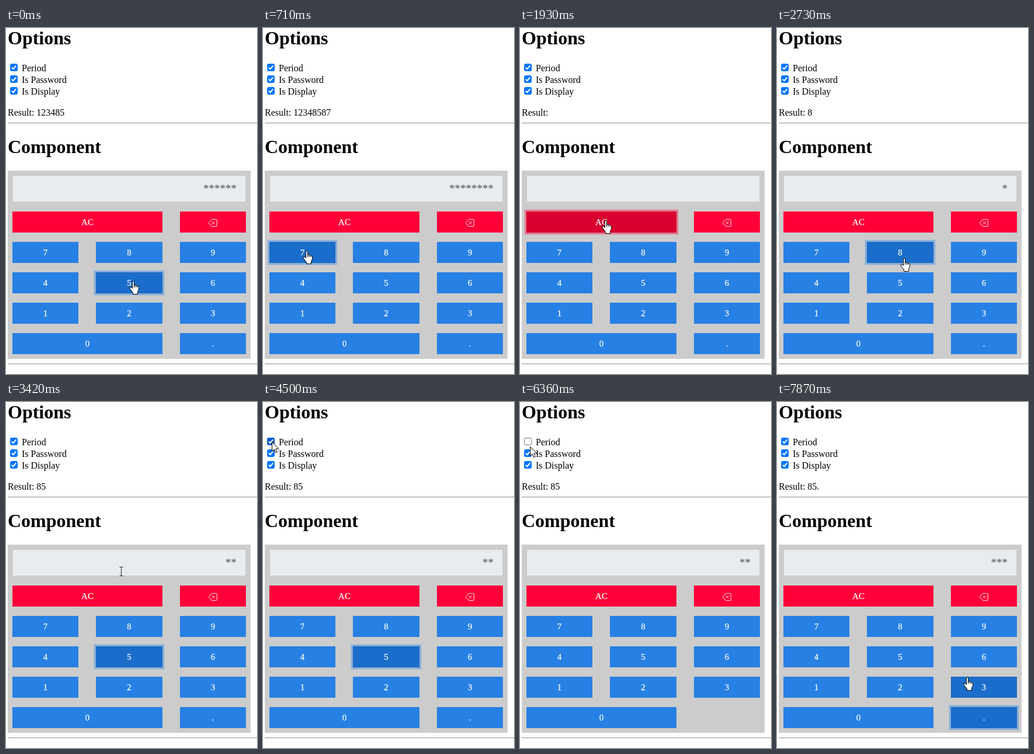
An HTML page for the animation above (7.99 s loop, 430 by 592 pixels).

```html
<!DOCTYPE html>
<html lang="en">
<head>
<meta charset="utf-8">
<title>Keypad</title>
<style>
html, body { margin: 0; width: 100%; height: 100%; overflow: hidden; background: #fff; }
svg { display: block; width: 430px; height: 592px; font: 16px "Liberation Serif", "Times New Roman", serif; }
.h1 { font-size: 32px; font-weight: bold; }
.key { fill: #2780e3; stroke: #2780e3; }
.key.red { fill: #ff0039; stroke: #ff0039; }
.key.dark { fill: #1a6dca; stroke: #1967be; }
.key.red.dark { fill: #d90030; stroke: #cc002e; }
.ring { fill: rgba(71, 147, 231, .5); }
.ring.red { fill: rgba(255, 38, 87, .5); }
.cap { fill: #fff; stroke: #fff; stroke-width: .25px; font-size: 15px; text-anchor: middle; }
.line { fill: none; stroke: #fff; }
.hand, .arrow { fill: #fff; stroke: #000; stroke-linejoin: round; }
.beam { fill: none; stroke: #222; }
</style>
</head>
<body>
<svg viewBox="0 0 430 592">
  <text class="h1" x="3" y="28">Options</text>
  <text class="h1" x="3" y="214">Component</text>
  <text id="result" x="3" y="150"></text>
  <path d="M3 162.5H430M3 574.5H430" stroke="#9a9a9a"/>
  <path d="M3 163.5H430M3 575.5H430" stroke="#eee"/>
  <rect x="3" y="244" width="416" height="322" fill="#ccc"/>
  <rect x="12" y="253" width="398" height="44" fill="#e9ecef"/>
  <text id="stars" x="395" y="281" text-anchor="end" font-size="19" fill="#495057"></text>
  <g id="boxes"></g>
  <g id="keys"></g>
  <path class="line" transform="translate(347 326) scale(.9375)"
    d="M13.7 1.5a1.5 1.5 0 0 1 1.5 1.5v10a1.5 1.5 0 0 1-1.5 1.5H6.6a1.5 1.5 0 0 1-1.14-.52L.62 8.33a.5.5 0 0 1 0-.66L5.46 2.02A1.5 1.5 0 0 1 6.6 1.5zM6.2 5.5l5 5m0-5l-5 5"/>
  <g id="cursor">
    <path class="arrow" d="M-.5.5V16.5L3.2 13 5.6 18.6 8.2 17.5 5.8 12H11Z"/>
    <g class="hand" transform="translate(-7 -2)">
      <path d="M5.5 13.5V2.5a1.5 1.5 0 0 1 3 0V8.2q1.6-1 2.7.6 1.6-.7 2.6.8 2.3-.4 2.7 1.7V15.5l-2 4v4H6.5V21L2 15Q.4 12.6 1 11.4 2.6 10.4 5.5 13.5Z"/>
      <path d="M8.5 8V12M11.2 8.8V12M13.8 9.6V12" fill="none"/>
    </g>
    <path class="beam" transform="translate(.5 0)" d="M-3-7.5H3M0-7.5V7.5M-3 7.5H3"/>
  </g>
</svg>
<script>
const LOOP = 7990, STEP = 135, SPEED = .4; // ms, ms, px per ms

const $ = id => document.getElementById(id);
function add(parent, tag, attrs, text = '') {
  const el = document.createElementNS('http://www.w3.org/2000/svg', tag);
  for (const k in attrs) el.setAttribute(k, attrs[k]);
  el.textContent = text;
  return parent.appendChild(el);
}
const show = (el, on) => el.style.display = on ? '' : 'none';
const inside = (r, x, y) => x >= r.x && x < r.x + r.w && y >= r.y && y < r.y + r.h;

const boxes = ['Period', 'Is Password', 'Is Display'].map((name, i) => {
  const x = 7, y = 61 + 20 * i, g = $('boxes');
  add(g, 'text', { x: 27, y: y + 13 }, name);
  const rect = add(g, 'rect', { x: x + .5, y: y + .5, width: 12, height: 12, rx: 2 });
  const tick = add(g, 'path', { class: 'line', 'stroke-width': 2, d: `M9.7 ${y + 6.6}l2.6 2.6 5-5.8` });
  return { name, x, y, w: 13, h: 13, aim: [x + 9, y + 7], rect, tick };
});

function makeKey(name, col, row, wide) {
  const x = Math.round(11 + 143.5 * col - .1), y = 314 + 52 * row;
  const w = wide ? 257 : 113 + col % 2, h = 36, red = row ? '' : ' red';
  const g = add($('keys'), 'g', {});
  const ring = add(g, 'rect', { class: 'ring' + red, x: x - 3.2, y: y - 3.2, width: w + 6.4, height: h + 6.4 });
  const face = add(g, 'rect', { class: 'key' + red, x: x + .5, y: y + .5, width: w - 1, height: h - 1 });
  add(g, 'text', { class: 'cap', x: x + w / 2, y: y + 23 }, name);
  return { name, x, y, w, h, aim: [x + w / 2 + 7, y + h / 2 - 2], g, ring, face };
}
const keys = [makeKey('AC', 0, 0, true), makeKey('', 2, 0),
  ...[...'789456123'].map((d, i) => makeKey(d, i % 3, 1 + Math.floor(i / 3))),
  makeKey('0', 0, 4, true), makeKey('.', 2, 4)];
const display = { x: 12, y: 253, w: 398, h: 44 };

// the pointer's stops: arrival time, what it presses, place if not the pressed control
const stops = [
  [0, '5'], [424, '8'], [690, '7'], [956, '4'], [1250, '', 176, 362],
  [1515, 'AC'], [2050, '', 206, 354], [2460, '', 218, 395], [2730, '8', 218, 395],
  [3000, '5'], [3415, '', 197, 290], [3690, '', 176, 304],
  [4500, '', 16, 68], [5190, 'Period'], [5960, '', 345, 528], [6360, '', 18, 76],
  [6520, 'Period'], [7320, '.'], [7870, '', 326, 472],
].map(([at, press, ...place]) => {
  const [x, y] = place.length ? place : [...keys, ...boxes].find(c => c.name === press).aim;
  return { at, press, x, y };
});

// travel at a steady speed, as late as possible, seen in steps
function pointer(t) {
  const i = stops.findIndex(s => s.at > t);
  if (i < 0) return stops[stops.length - 1];
  const a = stops[i - 1], b = stops[i], dx = b.x - a.x, dy = b.y - a.y;
  const span = Math.min(Math.hypot(dx, dy) / SPEED, b.at - a.at) || 1;
  const gone = Math.max(0, t - b.at + span);
  const k = Math.floor(gone / STEP) * STEP / span;
  return { x: Math.round(a.x + dx * k), y: Math.round(a.y + dy * k) };
}

function stateAt(t) {
  const s = { result: '12348', focus: '', period: true };
  for (const { at, press } of stops) {
    if (at > t || !press) continue;
    s.focus = press;
    if (press === 'Period') s.period = !s.period;
    else s.result = press === 'AC' ? '' : s.result + press;
  }
  return s;
}

const [arrow, hand, beam] = $('cursor').children;

function draw(t) {
  const { x, y } = pointer(t), { result, focus, period } = stateAt(t);

  $('result').textContent = 'Result: ' + result;
  $('stars').textContent = '*'.repeat(result.length);

  for (const b of boxes) {
    const on = b.name !== 'Period' || period, over = inside(b, x, y);
    const blue = over ? '#005cc8' : '#0075ff';
    b.rect.setAttribute('fill', on ? blue : '#fff');
    b.rect.setAttribute('stroke', on ? blue : over ? '#4f4f4f' : '#767676');
    show(b.tick, on);
  }

  let overKey = false;
  for (const k of keys) {
    const visible = k.name !== '.' || period;
    const over = visible && inside(k, x, y), focused = k.name !== '' && k.name === focus;
    overKey ||= over;
    show(k.g, visible);
    show(k.ring, focused);
    k.face.classList.toggle('dark', over || focused);
  }

  const overDisplay = inside(display, x, y);
  show(hand, overKey);
  show(beam, overDisplay);
  show(arrow, !overKey && !overDisplay);
  $('cursor').setAttribute('transform', `translate(${x} ${y})`);
}

const start = performance.now();
function tick() {
  draw((performance.now() - start) % LOOP);
  requestAnimationFrame(tick);
}
tick();
</script>
</body>
</html>
```
